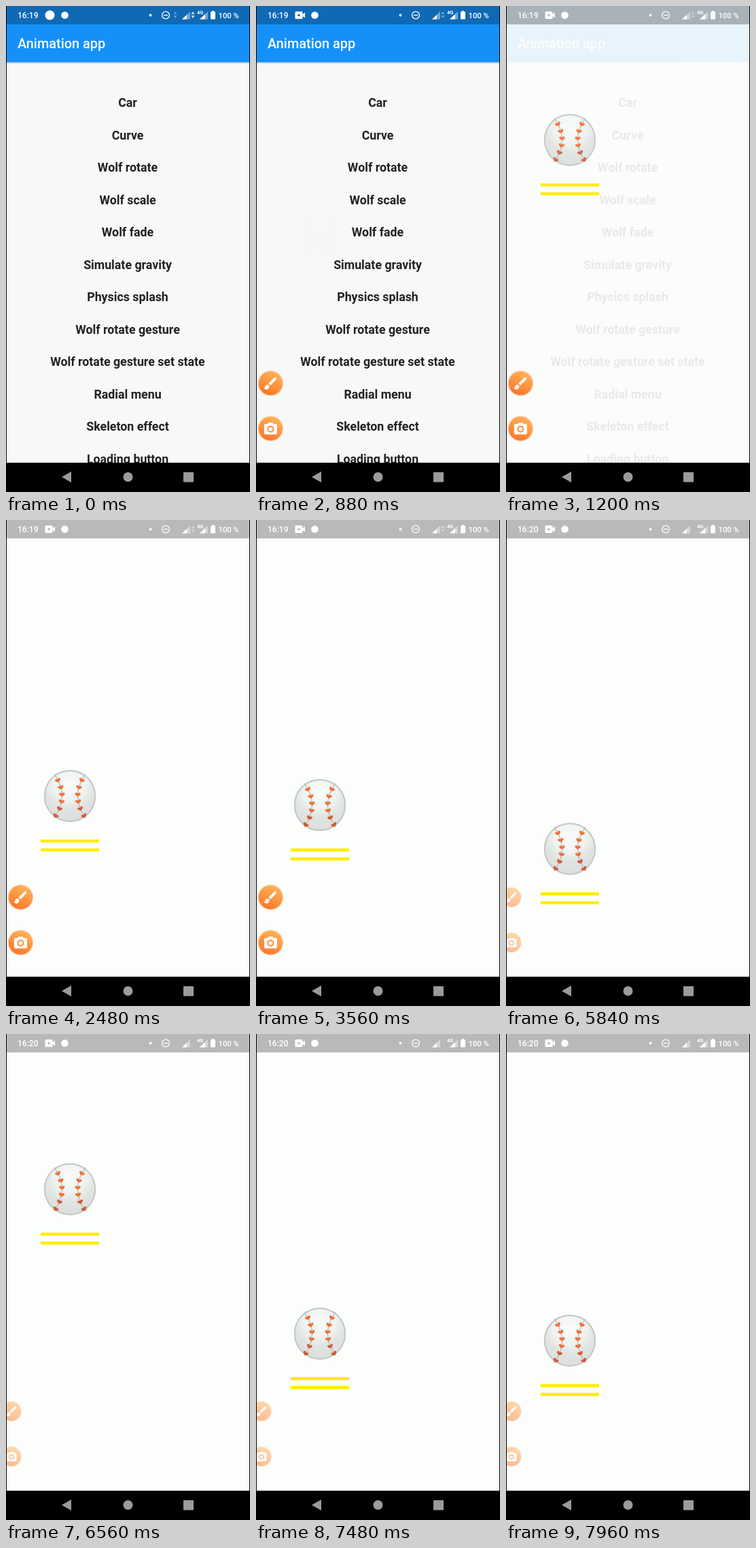
Animation, 359 px wide and 713 px high, one loop 8 s. Source, as an HTML page:

```html
<!DOCTYPE html>
<html lang="en">
<head>
<meta charset="utf-8">
<title>Gravity demo</title>
<style>
html, body { margin: 0; width: 100%; height: 100%; overflow: hidden; background: #000; }
svg { display: block; width: 100%; height: 100%; }
text { font-family: Roboto, sans-serif; }
#list text { font-size: 17.8px; font-weight: 700; text-anchor: middle; fill: #212121; }
</style>
</head>
<body>
<svg viewBox="0 0 359 713">
  <defs>
    <clipPath id="screen"><rect x="1" width="357" height="670"/></clipPath>
    <radialGradient id="leather" cx=".5" cy=".25" r=".72">
      <stop offset="0" stop-color="#f9fcfa"/>
      <stop offset=".45" stop-color="#eff3f0"/>
      <stop offset=".7" stop-color="#e0e4e1"/>
      <stop offset="1" stop-color="#dcdfdd"/>
    </radialGradient>
    <linearGradient id="orange" x1=".75" y1="0" x2=".3" y2="1">
      <stop offset="0" stop-color="#ffb55c"/>
      <stop offset="1" stop-color="#fb7628"/>
    </linearGradient>
    <linearGradient id="shade" x2="0" y2="1">
      <stop offset="0" stop-opacity=".2"/>
      <stop offset="1" stop-opacity="0"/>
    </linearGradient>
  </defs>
  <rect width="359" height="713"/>
  <g clip-path="url(#screen)">
    <rect width="359" height="670" fill="#f7f9f7"/>
    <g id="list"></g>
    <rect y="82" width="359" height="4" fill="url(#shade)"/>
    <rect width="359" height="82.5" fill="#1490f8"/>
    <text x="17" y="62" font-size="19.9" font-weight="500" fill="#fff">Animation app</text>
    <g id="page">
      <rect width="359" height="890" fill="#fcfefc"/>
      <g id="ball">
        <circle r="37.2" fill="url(#leather)" stroke="#c3c6c4" stroke-width="2"/>
        <g id="seams"></g>
        <path d="M-43 66H43M-43 79H43" stroke="#ffed00" stroke-width="4.6"/>
      </g>
    </g>
    <rect width="359" height="27" fill-opacity=".27"/>
    <g id="buttons">
      <g>
        <circle r="19" fill="#fbdcc6"/><circle r="17.6" fill="url(#orange)"/>
        <path transform="translate(-12 -12)" fill="#fff" d="M7 14c-1.66 0-3 1.34-3 3 0 1.31-1.16 2-2 2 .92 1.22 2.49 2 4 2 2.21 0 4-1.79 4-4 0-1.66-1.34-3-3-3zm13.71-9.37l-1.34-1.34c-.39-.39-1.02-.39-1.41 0L9 12.25 11.75 15l8.96-8.96c.39-.39.39-1.02 0-1.41z"/>
      </g>
      <g>
        <circle r="19" fill="#fbdcc6"/><circle r="17.6" fill="url(#orange)"/>
        <path transform="translate(-11.4 -10.6) scale(.95)" fill="#fff" d="M9 2L7.2 4H4a2 2 0 0 0-2 2v12a2 2 0 0 0 2 2h16a2 2 0 0 0 2-2V6a2 2 0 0 0-2-2h-3.2L15 2z"/>
        <circle cy=".7" r="4" fill="none" stroke="#fc8a38" stroke-width="2"/>
      </g>
    </g>
    <g fill="#fff">
      <text id="clock" x="17" y="18" font-size="12" font-weight="500"></text>
      <circle id="badge" cx="64.5" cy="13.5" r="7"/>
      <g id="camera">
        <rect x="57.5" y="8" width="11" height="11" rx="1.5"/>
        <path d="M68 12.5l4-3v8l-4-3z"/>
        <circle id="lens" cx="63" cy="13.5" r="1.7"/>
      </g>
      <circle cx="86.5" cy="13.5" r="5.3"/>
      <circle cx="212.5" cy="13.5" r="1.9"/>
      <circle cx="235" cy="13.5" r="5.4" fill="none" stroke="#fff" stroke-width="1.3"/>
      <path d="M232 12.8h6v1.4h-6z"/>
      <path id="arrowsA" opacity=".35" d="M246.5 12l2.5-4 2.5 4zM246.5 14h5l-2.5 4z"/>
      <path id="arrowsB" d="M272.5 12l2.5-4 2.5 4zM272.5 14h5l-2.5 4z"/>
      <path opacity=".4" d="M259 19.5L271 8v11.5zM285 19.5L297 8v11.5z"/>
      <path d="M259 19.5L266 13v6.5zM285 19.5L293 12v7.5z"/>
      <text x="281" y="12" font-size="7.5" font-weight="700">4G</text>
      <path d="M303 7h3v1.3h1a1 1 0 0 1 1 1V18.5a1 1 0 0 1-1 1h-5a1 1 0 0 1-1-1V9.3a1 1 0 0 1 1-1h1z"/>
      <text x="312.5" y="18" font-size="11.3" font-weight="500">100 %</text>
    </g>
  </g>
  <g fill="#9b9b9b">
    <path d="M82 691L96 683v16z"/>
    <circle cx="179.5" cy="691" r="7"/>
    <rect x="261" y="684" width="15" height="14.5" rx="1"/>
  </g>
</svg>
<script>
const LOOP = 8000, TICK = 40;
const RECORD = 200, OPEN = 870, DROP = 940, MINUTE = 3800, REDROP = 5940;
const SKIP_AT = 7440, SKIP = 126;
const TOP = 151, FLOOR = 445, FALL = 1813, REST = 90;

const $ = id => document.getElementById(id);
const ramp = (t, from, span) => Math.max(0, Math.min(1, (t - from) / span));
const show = (id, on) => $(id).setAttribute("display", on ? "inline" : "none");

const rows = ["Car", "Curve", "Wolf rotate", "Wolf scale", "Wolf fade",
  "Simulate gravity", "Physics splash", "Wolf rotate gesture",
  "Wolf rotate gesture set state", "Radial menu", "Skeleton effect", "Loading button"];
$("list").innerHTML = rows.map((s, i) =>
  `<text x="179" y="${148.2 + 47.5 * i}">${s}</text>`).join("");

// Hearts strung along one seam, then mirrored.
const heart = "M0 3C-2 1.6-4.2 .6-4.2-1C-4.2-3.2-1-3.3 0-1.4C1-3.3 4.2-3.2 4.2-1C4.2 .6 2 1.6 0 3z";
let seam = `<path d="M-23-32Q0 0-23 32" fill="none" stroke="#bec2bf" stroke-width="1.5"/>`;
for (let i = 0; i < 6; i++) {
  const u = .14 + .163 * i;
  const x = -23 + 46 * u * (1 - u), y = -32 + 64 * u;
  const turn = -Math.atan2(46 * (1 - 2 * u), 64) * 180 / Math.PI;
  seam += `<path d="${heart}" transform="translate(${x} ${y}) rotate(${turn})" fill="${i < 4 ? "#f4703a" : "#cf5c3c"}"/>`;
}
$("seams").innerHTML = `<g>${seam}</g><g transform="scale(-1 1)">${seam}</g>`;

// Top of the ball at a given age: one fall, then bounces that shrink in height and time.
function ballTop(age) {
  if (age < FALL) return TOP + (FLOOR - TOP) * (Math.max(0, age) / FALL) ** 1.89;
  let start = FALL + REST, half = 825, height = 66;
  while (age > start + 2 * half && height > 1) {
    start += 2 * half + REST;
    height *= .233;
    half *= Math.sqrt(.233);
  }
  const u = (age - start) / half - 1;
  return FLOOR - height * Math.max(0, 1 - u * u);
}

function draw(t) {
  const age = t < REDROP ? t - DROP : t - REDROP + (t > SKIP_AT ? SKIP : 0);
  $("ball").setAttribute("transform", `translate(94 ${ballTop(age) + 38})`);

  const enter = ramp(t, OPEN, 350);
  $("page").setAttribute("opacity", enter ** 1.6);
  $("page").setAttribute("transform", `translate(0 ${167 * (1 - enter) ** 3})`);

  // Floating buttons appear, then dim and tuck into the left edge.
  const dim = 1 - .5 * ramp(t, 4040, 240);
  const tuck = 1 - (1 - ramp(t, 4200, 880)) ** 1.4;
  $("buttons").setAttribute("opacity", ramp(t, 80, 160) * dim);
  [...$("buttons").children].forEach((b, i) => b.setAttribute("transform",
    `translate(${21.5 - 13.5 * tuck} ${553.5 + 66.5 * i}) scale(${1 - .2 * tuck})`));

  const recording = t >= RECORD;
  $("clock").textContent = t < MINUTE ? "16:19" : "16:20";
  show("badge", !recording);
  show("camera", recording);
  show("arrowsA", !recording);
  show("arrowsB", t < MINUTE);
  $("arrowsB").setAttribute("opacity", recording ? .4 : .8);
  $("lens").setAttribute("fill", enter > .5 ? "#b8b9b8" : "#0f69b5");
}

function frame() {
  const t = performance.now() % LOOP;
  draw(t - t % TICK);
  requestAnimationFrame(frame);
}
frame();
</script>
</body>
</html>
```
